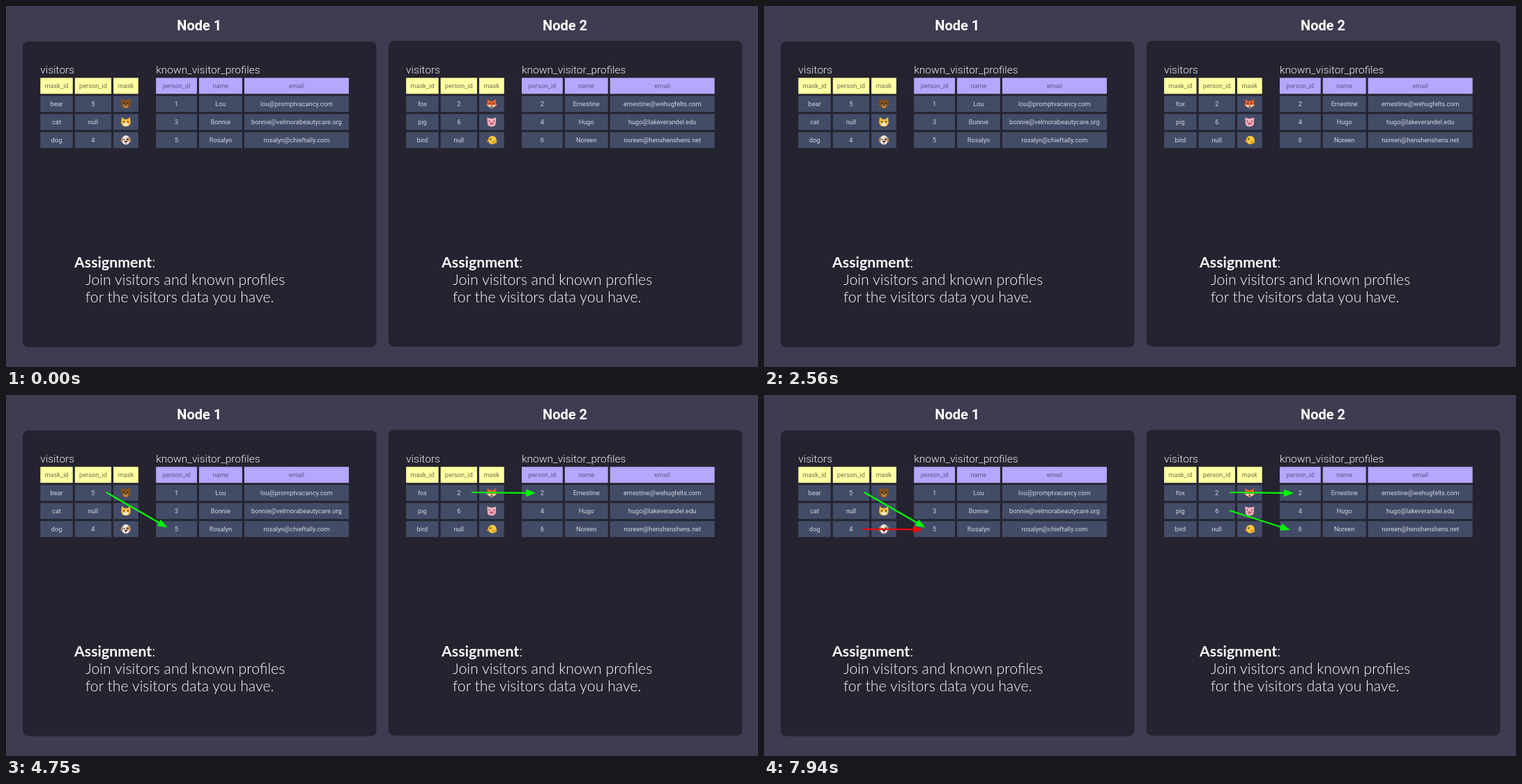
An HTML page that plays this animation: 1079 by 519 pixels, repeating every 8 s.

```html
<!DOCTYPE html>
<html lang="en">
<head>
<meta charset="utf-8">
<title>Join per node</title>
<style>
  html, body { margin: 0; width: 100%; height: 100%; overflow: hidden; background: #3d3c50; }
  svg { display: block; }
  text { font-family: Roboto, sans-serif; }
  .node { font-size: 20px; font-weight: 700; fill: #fff; text-anchor: middle; }
  .title { font-size: 15.5px; font-weight: 300; fill: #eeeef2; }
  .cell { font-size: 9.2px; fill: #d2d5de; text-anchor: middle; }
  .task { font: 300 21.3px Lato, sans-serif; fill: #fff; }
  .task tspan { font-weight: 700; }
</style>
</head>
<body>
<svg id="stage" width="1079" height="519" viewBox="0 0 1079 519">
  <defs>
    <g id="bear">
      <g fill="#80501f"><circle cx="-5" cy="-4.3" r="2.4"/><circle cx="5" cy="-4.3" r="2.4"/><ellipse cy=".4" rx="6.8" ry="6.4"/></g>
      <ellipse cy="3" rx="3.4" ry="2.8" fill="#bd8848"/>
      <g fill="#20170f"><circle cx="-2.7" cy="-.7" r=".9"/><circle cx="2.7" cy="-.7" r=".9"/><ellipse cy="1.9" rx="1.5" ry="1"/></g>
    </g>
    <g id="cat">
      <path d="M-6-7-2-4H2L6-7 6.8 1Q6 6.5 0 6.5T-6.8 1Z" fill="#f6bd45"/>
      <ellipse cy="3.4" rx="3.6" ry="2.5" fill="#fff0cf"/>
      <g fill="#3c3018"><circle cx="-3" cy="0" r="1.1"/><circle cx="3" cy="0" r="1.1"/></g>
      <path d="M-1 2H1L0 3.2Z" fill="#d86f65"/>
    </g>
    <g id="dog">
      <ellipse rx="5.8" ry="6.7" fill="#f0ece6"/>
      <path d="M-4-5Q-8-4-7 3-5 4-4 0ZM4-5Q8-4 7 3 5 4 4 0Z" fill="#b6895f"/>
      <ellipse cx="2.4" cy="-1" rx="2" ry="2.8" fill="#bd946d"/>
      <g fill="#2b211d"><circle cx="-2.3" cy="-.7" r="1"/><circle cx="2.3" cy="-.7" r="1"/><ellipse cy="2.2" rx="1.8" ry="1.2"/></g>
      <ellipse cy="5" rx="1.2" ry="1.3" fill="#e3737a"/>
    </g>
    <g id="fox">
      <path d="M-6.5-7-2-4H2L6.5-7 6-2 7.5 2 0 6.5-7.5 2-6-2Z" fill="#e9602c"/>
      <path d="M-6.8 2-2 1 0 3 2 1 6.8 2 0 6.5Z" fill="#f5d9c2"/>
      <g fill="#35221b"><circle cx="-2.6" cy="-.3" r="1"/><circle cx="2.6" cy="-.3" r="1"/><ellipse cy="4.4" rx="1.5" ry="1.1"/></g>
    </g>
    <g id="pig">
      <path d="M-6.5-6.5-2-5H2L6.5-6.5 6 0Q6.5 6.7 0 6.7T-6 0Z" fill="#f5b2be"/>
      <ellipse cy="2.3" rx="3.4" ry="2.3" fill="#e88398"/>
      <g fill="#532f38"><circle cx="-3.4" cy="-1.3" r=".9"/><circle cx="3.4" cy="-1.3" r=".9"/><circle cx="-1.1" cy="2.3" r=".7"/><circle cx="1.1" cy="2.3" r=".7"/></g>
    </g>
    <g id="bird">
      <circle cx="1" r="6" fill="#f7ca3e"/>
      <path d="M-4-1-7.5 2-4 3Z" fill="#ef8a32"/>
      <ellipse cx="4" cy="2.8" rx="3.5" ry="2.2" fill="#e5a72c"/>
      <circle cx="-1.5" cy="-1.3" r="1.1" fill="#3a2814"/>
    </g>
  </defs>
</svg>
<script>
const NS = 'http://www.w3.org/2000/svg';
const stage = document.getElementById('stage');
const LOOP = 8000;

function add(tag, attrs, text) {
  const el = document.createElementNS(NS, tag);
  for (const key in attrs) el.setAttribute(key, attrs[key]);
  if (text) el.textContent = text;
  return stage.appendChild(el);
}

function table(x, title, widths, rows, headFill, headInk) {
  add('text', { class: 'title', x, y: 96.5 }, title);
  rows.forEach((row, r) => {
    let left = x;
    const top = 103.3 + 26 * r;
    row.forEach((value, c) => {
      const mid = left + widths[c] / 2;
      add('rect', { x: left, y: top, width: widths[c], height: 23, fill: r ? '#434c67' : headFill });
      if (r && value[0] === '#')
        add('use', { href: value, x: mid, y: top + 11.4 });
      else
        add('text', { class: 'cell', x: mid, y: top + 14.5, ...(r ? {} : { style: `fill:${headInk}` }) }, value);
      left += widths[c] + 3;
    });
  });
}

function node(n, dx, dy, visitors, profiles) {
  add('rect', { x: 24 + dx, y: 51 + dy, width: 507.5, height: 439.5, rx: 8, fill: '#24232f' });
  add('text', { class: 'node', x: 277.3 + dx, y: 35 }, `Node ${n}`);
  table(49.3 + dx, 'visitors', [46.5, 52.3, 35.8],
    [['mask_id', 'person_id', 'mask'], ...visitors], '#ffffa3', '#73734f');
  table(215.2 + dx, 'known_visitor_profiles', [58.8, 61.9, 150],
    [['person_id', 'name', 'email'], ...profiles], '#b5a6ff', '#625889');
  const tx = dx ? 527 : 0;
  const label = add('text', { class: 'task', x: 98 + tx, y: 375.5 });
  label.innerHTML = '<tspan>Assignment</tspan>:';
  add('text', { class: 'task', x: 114 + tx, y: 400.7 }, 'Join visitors and known profiles');
  add('text', { class: 'task', x: 114 + tx, y: 426.4 }, 'for the visitors data you have.');
}

node(1, 0, 0,
  [['bear', '5', '#bear'], ['cat', 'null', '#cat'], ['dog', '4', '#dog']],
  [['1', 'Lou', 'lou@promptvacancy.com'],
   ['3', 'Bonnie', 'bonnie@velmorabeautycare.org'],
   ['5', 'Rosalyn', 'rosalyn@chieftally.com']]);
node(2, 524.8, -.8,
  [['fox', '2', '#fox'], ['pig', '6', '#pig'], ['bird', 'null', '#bird']],
  [['2', 'Ernestine', 'ernestine@wehugfelts.com'],
   ['4', 'Hugo', 'hugo@lakeverandel.edu'],
   ['6', 'Noreen', 'noreen@henshenshens.net']]);

const arrows = [];
function arrow(from, to, color, x1, y1, x2, y2) {
  const length = Math.hypot(x2 - x1, y2 - y1);
  const angle = Math.atan2(y2 - y1, x2 - x1) * 180 / Math.PI;
  const el = add('path', {
    d: `M0-1.1H${length - 14}V-5.3L${length} 0 ${length - 14} 5.3V1.1H0Z`,
    transform: `translate(${x1} ${y1}) rotate(${angle})`,
    fill: color
  });
  arrows.push({ el, from, to });
}

const MATCH = '#00ff00', MISS = '#ff0000';
arrow(4150, LOOP, MATCH, 144, 140, 231.5, 190.5);
arrow(4150, LOOP, MATCH, 668, 140, 760, 141);
arrow(5200, LOOP, MATCH, 668, 166, 755, 194);
arrow(5200, 6300, MISS, 141, 193, 222, 143);
arrow(6300, 7350, MISS, 141, 193, 225, 168);
arrow(7350, LOOP, MISS, 142, 193, 228, 193.3);

const start = performance.now();
function draw() {
  const t = (performance.now() - start) % LOOP;
  for (const { el, from, to } of arrows)
    el.setAttribute('visibility', t >= from && t < to ? 'visible' : 'hidden');
  requestAnimationFrame(draw);
}
draw();
</script>
</body>
</html>
```
